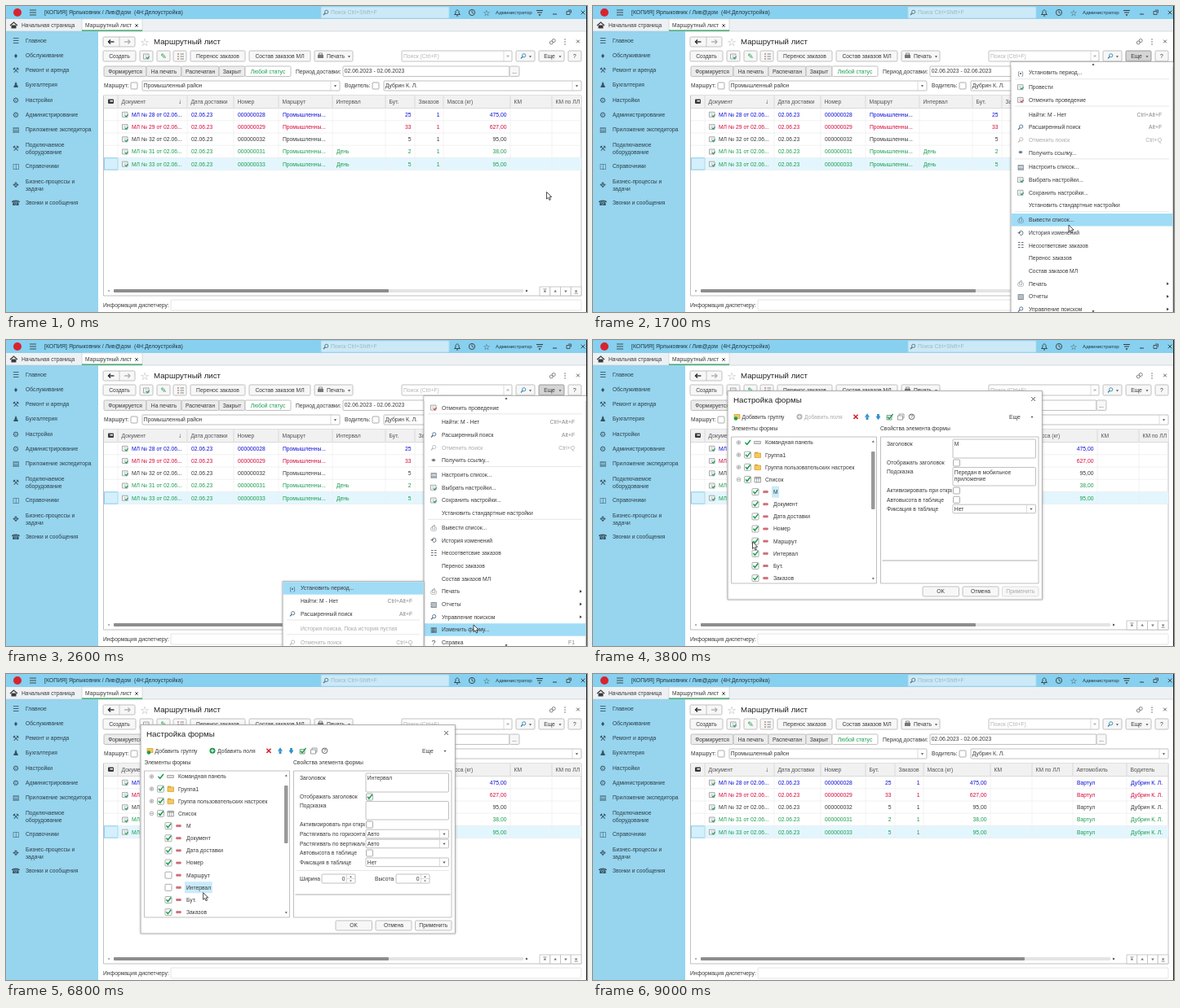
Animation of 712 by 376 pixels, one loop 9.6 s. Source, as an HTML page with a canvas:

```html
<!DOCTYPE html>
<html lang="ru">
<head>
<meta charset="utf-8">
<title>Маршрутный лист</title>
<style>
html, body { margin: 0; width: 100%; height: 100%; overflow: hidden; background: #fff; }
canvas { display: block; }
</style>
</head>
<body>
<canvas id="stage" width="712" height="376"></canvas>
<script>
const g = document.getElementById('stage').getContext('2d');
const INK = '#3a3a3a', DIM = '#a9a9a9', LINE = '#b0b0b0', GREEN = '#1a9c4e', BLUE = '#2f86b5', HOVER = '#a0dcf6';
const DRIVER = 'Дубрин К. Л.', CAR = 'Вартул';
const LOOP = 9600;

// ---- drawing helpers ----
function text(s, x, y, color = INK, size = 6.75, align = 'left') {
  g.font = `${size}px "Liberation Sans", Arial, "DejaVu Sans", sans-serif`;
  g.textAlign = align;
  g.fillStyle = color;
  g.fillText(s, x, y + size * .36);
}
const glyph = (s, x, y, color = INK, size = 8) => text(s, x, y, color, size, 'center');
function rect(x, y, w, h, fill, stroke, radius = 0) {
  g.beginPath();
  g.roundRect(x, y, w, h, radius);
  if (fill) { g.fillStyle = fill; g.fill(); }
  if (stroke) { g.strokeStyle = stroke; g.lineWidth = .8; g.stroke(); }
}
function shadowed(x, y, w, h, stroke) {
  g.save();
  g.shadowColor = '#0003';
  g.shadowBlur = 3;
  rect(x, y, w, h, '#fff', stroke);
  g.restore();
}
function path(points, color = INK, width = 1) {
  g.beginPath();
  for (let i = 0; i < points.length; i += 2) g.lineTo(points[i], points[i + 1]);
  g.strokeStyle = color;
  g.lineWidth = width;
  g.stroke();
}
function dot(x, y, r, fill, stroke) {
  g.beginPath();
  g.arc(x, y, r, 0, 7);
  if (fill) { g.fillStyle = fill; g.fill(); }
  if (stroke) { g.strokeStyle = stroke; g.lineWidth = .9; g.stroke(); }
}
function triangle(x, y, dx, dy, color = '#555', r = 2) {
  g.beginPath();
  g.moveTo(x + dx * r, y + dy * r);
  g.lineTo(x - dx * r / 2 + dy * r, y - dy * r / 2 + dx * r);
  g.lineTo(x - dx * r / 2 - dy * r, y - dy * r / 2 - dx * r);
  g.fillStyle = color;
  g.fill();
}
function clipped(x, y, w, h, draw) {
  g.save();
  g.beginPath();
  g.rect(x, y, w, h);
  g.clip();
  draw();
  g.restore();
}
const cross = (x, y, r = 2, color = INK, width = .9) => {
  path([x - r, y - r, x + r, y + r], color, width);
  path([x - r, y + r, x + r, y - r], color, width);
};
const arrow = (x, y, dir, color) => {
  path([x - 3.5, y, x + 3.5, y], color, 1.3);
  path([x + dir, y - 2.5, x + dir * 3.5, y, x + dir, y + 2.5], color, 1.3);
};
const magnifier = (x, y, color = BLUE) => {
  dot(x + .7, y - .7, 2.1, null, color);
  path([x - .8, y + .8, x - 3, y + 3], color, 1.3);
};
function button(label, x, y, w, h = 13, { color = INK, fill = '#f7f7f7', stroke = LINE, cx = x + w / 2 } = {}) {
  rect(x, y, w, h, fill, stroke, 1.5);
  text(label, cx, y + h / 2, color, 6.75, 'center');
}
function checkbox(x, y, on) {
  rect(x - 4, y - 4, 8, 8, '#fff', '#999', 1);
  if (on) path([x - 2.5, y - .3, x - .6, y + 2, x + 3.3, y - 3], GREEN, 1.5);
}
function field(value, x, y, w, h, drop) {
  rect(x, y, w, h, '#fff', LINE, 1);
  text(value, x + 1.8, y + Math.min(h / 2, 5.8));
  if (drop) {
    path([x + w - 11, y, x + w - 11, y + h], '#ccc', .7);
    triangle(x + w - 5.5, y + h / 2, 0, 1, '#555', 1.6);
  }
}
function page(x, y, mark = GREEN) {
  rect(x - 3.5, y - 3, 6.5, 6, '#fff', '#8a9299');
  for (const dy of [-1, 1]) path([x - 2, y + dy, x + 1.5, y + dy], '#aaa', .7);
  path([x, y + 1.2, x + 1.3, y + 2.6, x + 3.6, y], mark, 1.1);
}

// ---- main window ----
const SIDEBAR = [
  ['Главное', '☰', 42.5], ['Обслуживание', '♦', 61], ['Ремонт и аренда', '⚒', 79], ['Бухгалтерия', '♟', 97],
  ['Настройки', '⚙', 115.5], ['Администрирование', '⚙', 134], ['Приложение экспедитора', '▤', 152],
  ['Подключаемое|оборудование', '⚒', 170.5], ['Справочники', '◫', 197], ['Бизнес-процессы и|задачи', '✥', 215.5],
  ['Звонки и сообщения', '☎', 242]
];

function drawFrame() {
  rect(0, 0, 712, 376, '#fff');
  rect(0, 0, 712, 16, '#87d0ef');
  dot(14, 8, 5, '#d8242f');
  for (const y of [5, 8, 11]) path([29, y, 37, y], INK, .9);
  text('[КОПИЯ] Ярлыковник / Лив@дом  (4Н:Делоустройка)', 47, 8, '#26353c', 6.9);
  rect(386, 1, 157, 14, '#cbe9f7', '#a9d5e8', 1);
  magnifier(392, 8, '#4d7386');
  text('Поиск Ctrl+Shift+F', 398, 8, '#9bb8c5');
  path([549.5, 10.5, 551, 9, 551, 6.5, 553, 4.5, 555, 6.5, 555, 9, 556.5, 10.5, 549.5, 10.5], INK, .9);
  path([552, 12, 554, 12], INK);
  dot(571, 8, 3.6, null, INK);
  path([571, 5.5, 571, 8, 573, 9], INK, .8);
  glyph('☆', 589, 8, INK, 10);
  text('Администратор', 600, 8, '#26353c', 6.2);
  path([650, 5.5, 658, 5.5], INK);
  path([651, 8, 657, 8], INK);
  triangle(654, 11, 0, 1, INK, 1.5);
  path([670, 10, 675, 10], INK);
  rect(687, 6.5, 4, 4, null, INK);
  path([689, 5, 692.5, 5, 692.5, 8.5], INK, .8);
  cross(707, 8, 2.3);

  rect(0, 16, 712, 15, '#eef1f3');
  rect(93, 16, 74, 15, '#fff', '#d0d4d6');
  rect(93, 29.5, 74, 1.5, GREEN);
  path([0, 31, 712, 31], '#c4ccd0', .7);
  path([5, 24, 9.5, 20, 14, 24], INK, 1.2);
  rect(6.5, 23.5, 6, 4, INK);
  text('Начальная страница', 19, 24);
  text('Маршрутный лист', 97, 24);
  cross(160, 24, 1.8);

  rect(0, 31, 113, 345, '#97d4ee');
  for (const [label, icon, y] of SIDEBAR) {
    const lines = label.split('|');
    glyph(icon, 12, y + (lines.length - 1) * 4, '#35525f', 9);
    lines.forEach((line, i) => text(line, 24, y + i * 8.6, '#2b3f48'));
  }
  rect(711, 0, 1, 376, '#222');
}

function drawForm(menuOpen) {
  button('', 119, 38, 39, 12);
  path([139, 38, 139, 50], LINE, .7);
  arrow(129, 44, -1, '#222');
  arrow(148.5, 44, 1, '#aaa');
  glyph('☆', 170, 44, '#aaa', 13);
  text('Маршрутный лист', 181, 44, '#222', 9.7);
  dot(668.3, 45, 2, null, '#777');
  dot(671.2, 42.5, 2, null, '#777');
  for (const y of [41, 44, 47]) dot(685, y, .7, '#555');
  cross(701, 43.5, 1.9, '#555');

  button('Создать', 119, 55, 40);
  for (const x of [164, 185, 205]) button('', x, 55, 16);
  page(172, 62);
  glyph('✎', 193, 61.5, GREEN, 9);
  for (const [i, y] of [59, 62, 65].entries()) {
    path([210, y, 212, y], i % 2 ? GREEN : '#d33', 1.2);
    path([213.5, y, 218, y], '#777', .9);
  }
  button('Перенос заказов', 226, 55, 67);
  button('Состав заказов МЛ', 298, 55, 75);
  button('Печать', 378, 55, 47, 13, { cx: 404 });
  rect(382, 60, 7, 4, '#777');
  rect(383.5, 58, 4, 2, '#fff', '#777');
  triangle(420.5, 62, 0, 1, '#555', 1.6);
  rect(485, 55, 135, 13, '#fff', LINE, 1);
  text('Поиск (Ctrl+F)', 487, 62, '#b5b5b5');
  path([610, 55, 610, 68], '#ccc', .7);
  cross(615, 61.5, 1.2, '#777', .7);
  button('', 625, 55, 23);
  magnifier(634, 61.5);
  triangle(642.5, 62, 0, 1, '#555', 1.5);
  button('Еще', 653, 55, 31, 13, { cx: 666, fill: menuOpen ? '#d5d5d5' : '#f7f7f7', stroke: menuOpen ? '#888' : LINE });
  triangle(679, 62, 0, 1, '#555', 1.5);
  button('?', 689, 55, 16);

  const tabs = ['Формируется', 'На печать', 'Распечатан', 'Закрыт', 'Любой статус'];
  const edges = [120, 172, 215, 261, 293, 349];
  tabs.forEach((label, i) => button(label, edges[i], 74, edges[i + 1] - edges[i], 12.5,
    i === 4 ? { color: GREEN, fill: '#fff' } : { fill: '#ececec' }));
  text('Период доставки:', 355, 80.5);
  field('02.06.2023 - 02.06.2023', 413, 74, 204, 12.5);
  button('...', 617, 74, 12, 12.5);

  text('Маршрут:', 120, 98);
  checkbox(157, 98);
  field('Промышленный район', 167, 92, 242, 12, true);
  text('Водитель:', 415, 98);
  checkbox(453, 98);
  field(DRIVER, 463, 92, 242, 12, true);

  text('Информация диспетчеру:', 119, 367.5);
  rect(202, 361, 503, 13, '#fff', '#ddd', 1);
}

// ---- orders table ----
const ROWS = [
  [28, 25, '475,00', '#0c0cd8', ''], [29, 33, '627,00', '#d6063c', ''], [32, 5, '95,00', INK, ''],
  [31, 2, '38,00', GREEN, 'День'], [33, 5, '95,00', GREEN, 'День']
];
const COLUMNS = [
  ['', 17], ['Документ', 85, r => `МЛ № ${r[0]} от 02.06...`], ['Дата доставки', 57, () => '02.06.23'],
  ['Номер', 55, r => '0000000' + r[0]], ['Маршрут', 66, () => 'Промышленны...'], ['Интервал', 65, r => r[4]],
  ['Бут.', 36, r => r[1], true], ['Заказов', 35, () => 1, true], ['Масса (кг)', 82, r => r[2], true],
  ['КМ', 51], ['КМ по ЛЛ', 50], ['Автомобиль', 66, () => CAR], ['Водитель', 51, () => DRIVER]
];

function drawTable(compact) {
  const rowY = i => 125.6 + i * 15.2;
  rect(119.5, 110, 585.5, 246, '#fff', LINE);
  clipped(120, 110, 585, 236, () => {
    rect(120, 110, 585, 15.5, '#f1f1f1');
    rect(120, rowY(4), 585, 15.2, '#e3f6fd');
    for (let i = 0; i < 6; i++) path([120, rowY(i), 705, rowY(i)], i ? '#ebebeb' : '#ccc', .7);
    rect(120.5, rowY(4) + .4, 16.5, 14.4, '#d3f0fc', '#7cc6e6');
    let x = 120;
    for (const [title, width, value, right] of COLUMNS) {
      if (compact && (title === 'Маршрут' || title === 'Интервал')) continue;
      const indent = title === 'Документ' ? 17 : 5;
      text(title, x + 4.5, 117.5, '#555');
      path([x + width, 110, x + width, 125], '#cfcfcf', .7);
      path([x + width, 125, x + width, rowY(5)], '#eee', .7);
      if (value) ROWS.forEach((row, i) => {
        const y = rowY(i) + 7.8;
        if (right) text(value(row), x + width - 4.5, y, row[3], 6.75, 'right');
        else text(value(row), x + indent, y, row[3]);
        if (indent > 5) page(x + 9, y);
      });
      x += width;
    }
    rect(125, 114.5, 7, 5.5, INK, null, 1);
    rect(127.5, 116, 3.5, 1.5, '#fff');
    glyph('↓', 213, 117.5, INK, 8);
  });
  rect(132, 348, 502, 4, '#e4e4e4', null, 1);
  rect(132, 348, compact ? 397 : 337, 4, '#8d8d8d', null, 1);
  triangle(126, 350, -1, 0, '#777', 1.3);
  triangle(638, 350, 1, 0, '#333', 1.6);
  for (let i = 0; i < 4; i++) {
    const x = 654 + i * 12.75, dy = i < 2 ? -1 : 1;
    rect(x, 345, 12.75, 11, '#fff', '#bbb');
    triangle(x + 6.4, 350.5, 0, dy, '#777', 1.8);
    if (i % 3 === 0) path([x + 4.3, 350.5 + dy * 2.6, x + 8.5, 350.5 + dy * 2.6], '#777', .8);
  }
}

// ---- menus: [label, icon, shortcut or ▸, disabled]; null is a separator ----
const PERIOD = ['Установить период...', '(•)'], FIND = ['Найти: М - Нет', '', 'Ctrl+Alt+F'];
const ADVANCED = ['Расширенный поиск', 'find', 'Alt+F'], CANCEL = ['Отменить поиск', 'find', 'Ctrl+Q', true];
const MENU = [
  ['Создать', 'page', 'Ins'], ['Скопировать', 'page', 'F9'], ['Изменить', '✎', 'F2'],
  ['Пометить на удаление', '✖', 'Del'], ['Обновить', '⟳', 'F5'], PERIOD, null,
  ['Провести', 'page'], ['Отменить проведение', 'page-'], null,
  FIND, ADVANCED, CANCEL, ['Получить ссылку...', '⚭'], null,
  ['Настроить список...', '▤'], ['Выбрать настройки...', 'page'], ['Сохранить настройки...', 'page'],
  ['Установить стандартные настройки', ''], null,
  ['Вывести список...', '⎙'], ['История изменений', '⟲'], ['Несоответсвие заказов', '☷'],
  ['Перенос заказов', ''], ['Состав заказов МЛ', ''], ['Печать', '⎙', '▸'], ['Отчеты', '▧', '▸'],
  ['Управление поиском', 'find', '▸'], ['Изменить форму...', '▦'], ['Справка', '?', 'F1']
];
const SUBMENU = [PERIOD, FIND, ADVANCED, null, ['История поиска. Пока история пустая', '', '', true], null, CANCEL];

function drawMenu(items, x, top, w, firstY, isHot) {
  shadowed(x, top, w, 400, '#aaa');
  clipped(x, top + .5, w, 376 - top, () => {
    let y = firstY;
    for (const item of items) {
      if (!item) {
        path([x + 5, y - 8, x + w - 5, y - 8], '#ddd', .7);
        y += 2;
        continue;
      }
      const [label, icon, key = '', off] = item;
      if (isHot(y)) rect(x + .5, y - 7.8, w - 1, 15.6, HOVER);
      if (icon.startsWith('page')) page(x + 12, y, icon.endsWith('-') ? '#d33' : GREEN);
      else if (icon === 'find') magnifier(x + 12, y, off ? '#b8b8b8' : '#4a6f8c');
      else glyph(icon, x + 12, y, '#4a5a66', icon.length > 1 ? 7 : 9);
      text(label, x + 22, y, off ? DIM : INK);
      if (key === '▸') triangle(x + w - 7, y, 1, 0, '#333', 1.8);
      else text(key, x + w - 14, y, off ? DIM : '#888', 6.75, 'right');
      y += 15.7;
    }
  });
}

function drawMainMenu(t, [cx, cy]) {
  const scroll = 76.5 * ramp(t, 1.2, 1.6) + 32.3 * ramp(t, 1.7, 2.1);
  drawMenu(MENU, 512, 68.5, 199, 80 - scroll, y => y > 74 && cx > 512 && Math.abs(cy - y) < 7.85);
  if (scroll > 0) {
    rect(512.5, 69, 198, 6, '#fff');
    triangle(613, 72, 0, -1, '#333', 1.5);
  }
  triangle(613, 375, 0, 1, '#333', 1.5);
  if (t >= 2.1) drawMenu(SUBMENU, 339, 296.5, 173, 305, y => y === 305);
}

// ---- form settings dialog ----
const GROUPS = ['Командная панель', 'Группа1', 'Группа пользовательских настроек', 'Список'];
const FIELDS = ['М', 'Документ', 'Дата доставки', 'Номер', 'Маршрут', 'Интервал', 'Бут.', 'Заказов'];

function drawTree(selected, hidden) {
  rect(169.5, 119, 178, 180, '#fff', LINE);
  GROUPS.forEach((label, i) => {
    const y = 126 + i * 15.15;
    dot(178.5, y, 2.3, '#fff', '#aaa');
    path([177, y, 180, y], '#888', .7);
    if (i < 3) path([178.5, y - 1.5, 178.5, y + 1.5], '#888', .7);
    if (i) checkbox(189.5, y, true);
    else path([186.5, y, 188.8, y + 2.3, 193, y - 3], GREEN, 1.5);
    if (i === 0) rect(197.5, y - 1.5, 8, 3, '#ddd', '#999');
    else if (i < 3) {
      rect(198, y - 3.5, 4, 2, '#d9a33a');
      rect(198, y - 2.2, 7.5, 5.5, '#f4c95d', '#d9a33a');
    } else {
      rect(198, y - 3, 7.5, 6.5, '#fff', '#888');
      for (const x of [200.5, 203]) path([x, y - 3, x, y + 3.5], '#888', .7);
      path([198, y - 1.5, 205.5, y - 1.5], '#888');
    }
    text(label, 211, y);
  });
  FIELDS.forEach((label, i) => {
    const y = 186.6 + i * 15.15;
    if (label === selected) {
      g.font = '6.75px "Liberation Sans", Arial, sans-serif';
      rect(219, y - 7, g.measureText(label).width + 3.5, 14, '#c9ebfa');
    }
    checkbox(199, y, !hidden.includes(label));
    rect(208.8, y - 1, 5.4, 2, '#d9727c', '#c4606c');
    text(label, 221, y);
  });
  rect(341, 137, 4.5, 71, '#999', null, 1);
  triangle(343.3, 125, 0, -1, '#555', 1.4);
  triangle(343.3, 293, 0, 1, '#555', 1.4);
}

function drawProperties(selected) {
  const marker = selected === 'М';
  const label = (s, y) => clipped(353, y - 6, 87, 12, () => text(s, 360, y));
  const select = (s, y, value) => { label(s, y); field(value, 441, y - 5.3, 101.5, 10.6, true); };
  const tick = (s, y, on) => { label(s, y); checkbox(445.5, y, on); };
  rect(352.5, 119, 193.5, 180, '#fff', LINE);
  label('Заголовок', 128);
  field(selected, 441, 122, 101.5, 23);
  tick('Отображать заголовок', 151, !marker);
  label('Подсказка', 162);
  field(marker ? 'Передан в мобильное' : '', 441, 156.5, 101.5, 22.5);
  if (marker) text('приложение', 442.8, 170.7);
  tick('Активизировать при открытии', 185);
  if (marker) {
    tick('Автовысота в таблице', 196.3);
    select('Фиксация в таблице', 207.5, 'Нет');
  } else {
    select('Растягивать по горизонтали', 196.5, 'Авто');
    select('Растягивать по вертикали', 208.5, 'Авто');
    tick('Автовысота в таблице', 220);
    select('Фиксация в таблице', 231.3, 'Нет');
    for (const [s, x, boxX] of [['Ширина', 360, 387], ['Высота', 452, 478]]) {
      text(s, x, 251.7);
      rect(boxX, 246, 41, 11, '#fff', LINE, 1);
      path([boxX + 30.5, 246, boxX + 30.5, 257], '#ccc', .7);
      path([boxX + 30.5, 251.5, boxX + 41, 251.5], '#ccc', .7);
      text('0', boxX + 28.5, 251.7, INK, 6.75, 'right');
      triangle(boxX + 35.5, 249.3, 0, -1, '#555', 1.2);
      triangle(boxX + 35.5, 254, 0, 1, '#555', 1.2);
    }
    path([356, 241.5, 543, 241.5], '#ddd', .7);
  }
  path([354.5, 271, 544.5, 271], '#999', .8);
}

function drawDialog(t) {
  const selected = t < 4.6 ? 'М' : t < 5.7 ? 'Маршрут' : 'Интервал';
  const hidden = [t >= 4.6 && 'Маршрут', t >= 5.7 && 'Интервал'];
  const canAdd = t >= 4.6, canApply = canAdd && t < 7.3, pressed = t >= 7.8;
  shadowed(165, 62.5, 385.5, 256.5, '#a8a8a8');
  text('Настройка формы', 172, 73, '#222', 9.8);
  cross(539.5, 72.5, 2.3);
  rect(173, 91.5, 7, 5, '#f4c95d', '#d9a33a');
  dot(175, 96.5, 2.2, GREEN);
  text('Добавить группу', 182.5, 94.5);
  dot(253, 94.3, 3.5, canAdd ? GREEN : '#b5b5b5');
  path([251, 94.3, 255, 94.3], '#fff');
  path([253, 92.3, 253, 96.3], '#fff');
  text('Добавить поля', 259, 94.5, canAdd ? INK : DIM);
  cross(322, 94.3, 2.6, '#d4232f', 1.5);
  for (const [x, dy] of [[336, -1], [349.5, 1]]) {
    triangle(x, 94.3 + dy, 0, dy, '#2f8fd0', 3);
    rect(x - 1.4, 93 - dy * 2, 2.8, 3, '#2f8fd0');
  }
  rect(360, 92.5, 6, 5.5, '#dff0e2', '#6d8f76');
  path([361, 94.5, 363, 97, 367.5, 91], GREEN, 1.3);
  rect(375, 91, 6, 5, '#fff', '#888');
  rect(373.5, 93, 6, 5, '#fff', '#888');
  dot(390.5, 94.3, 3.3, null, '#555');
  glyph('?', 390.5, 94.5, '#444', 5.5);
  text('Еще', 510, 94.5);
  triangle(538, 94.5, 0, 1, '#555', 1.5);
  text('Элементы формы', 169.5, 109);
  text('Свойства элемента формы', 352, 109);
  drawTree(selected, hidden);
  drawProperties(selected);
  button('OK', 404, 303, 44.5, 12, pressed ? { fill: '#e4e4e4', stroke: '#555' } : {});
  if (pressed) rect(404.8, 303.8, 42.9, 10.4, null, '#888', 1);
  button('Отмена', 453, 303, 44, 12);
  button('Применить', 501.5, 303, 44.5, 12, canApply ? {} : { color: DIM, stroke: '#d5d5d5' });
}

// ---- pointer ----
const TRACK = [
  [.1, 662.5, 228.5], [.8, 668, 62], [1.1, 668, 64], [1.7, 583, 269], [2.2, 573, 350], [2.8, 573, 350],
  [3.2, 455, 332], [3.4, 455, 332], [3.8, 195.5, 248], [4.7, 195.5, 248], [5.2, 202, 261], [6.3, 202, 261],
  [6.7, 209, 264], [7.2, 523, 309], [7.4, 523, 309], [7.8, 432, 311], [8.4, 432, 311], [8.9, 470, 390]
];
function ramp(t, from, to) {
  const k = Math.min(1, Math.max(0, (t - from) / (to - from)));
  return k * k * (3 - 2 * k);
}
function pointerAt(t) {
  let [, x, y] = TRACK[0];
  for (let i = 1; i < TRACK.length; i++) {
    const k = ramp(t, TRACK[i - 1][0], TRACK[i][0]);
    x += (TRACK[i][1] - TRACK[i - 1][1]) * k;
    y += (TRACK[i][2] - TRACK[i - 1][2]) * k;
  }
  return [x, y];
}
const POINTER = new Path2D('M0 0V8.6L2 6.8L3.4 10L4.9 9.3L3.5 6.2H6.2Z');
function drawPointer([x, y]) {
  g.save();
  g.translate(x, y);
  g.fillStyle = '#fff';
  g.fill(POINTER);
  g.strokeStyle = '#222';
  g.lineWidth = .8;
  g.stroke(POINTER);
  g.restore();
}

function render(now) {
  const t = Math.floor(now % LOOP / 100) / 10;
  const pointer = pointerAt(t);
  const menuOpen = t >= .9 && t < 2.8;
  drawFrame();
  drawForm(menuOpen);
  drawTable(t >= 7.3);
  if (menuOpen) drawMainMenu(t, pointer);
  if (t >= 2.9 && t < 8.4) drawDialog(t);
  drawPointer(pointer);
  requestAnimationFrame(render);
}
requestAnimationFrame(render);
</script>
</body>
</html>
```
